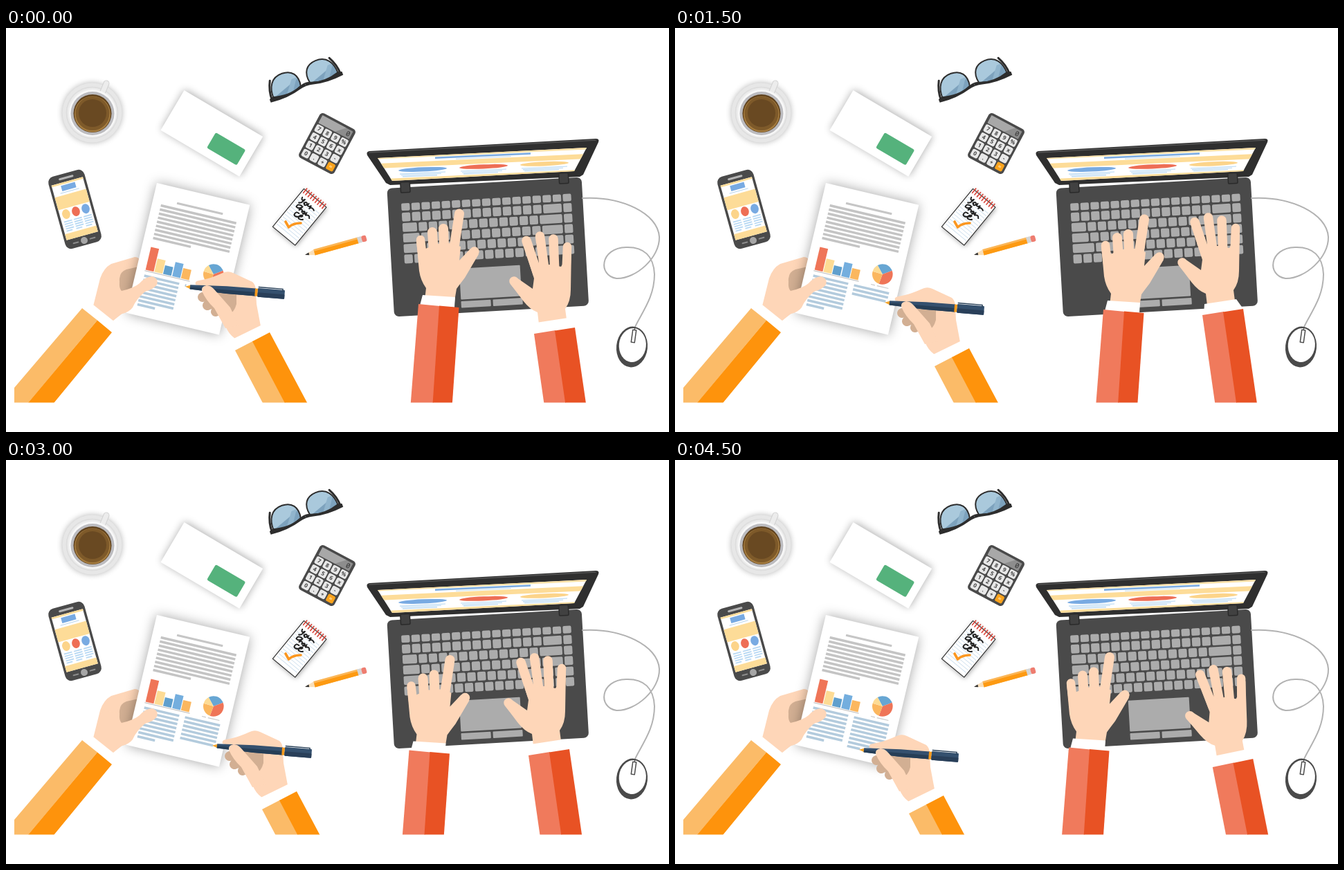
An HTML page with a canvas for the animation above (5 s loop, 958x584 px).

```html
<!DOCTYPE html>
<html lang="en">
<head>
<meta charset="utf-8">
<title>Desk work</title>
<style>
html, body { margin: 0; width: 100%; height: 100%; overflow: hidden; background: #fff; }
canvas { display: block; }
</style>
</head>
<body>
<canvas id="stage" width="958" height="584"></canvas>
<script>
const ctx = document.getElementById('stage').getContext('2d');
const SKIN = '#fed6b8', SHADE = '#d2af93', DARK = '#4a4a4a', NAVY = '#34506e', KEY = '#acacac';
const STEP = 500;

// Each pose: pen tip and row being written, left typing hand, right typing hand (dx, dy, degrees).
const poses = [
  { pen: [260, 374, 0], left: [0, 0], right: [0, 0, 0] },
  { pen: [308, 386, 0], left: [-6, -1], right: [9, 9, 0] },
  { pen: [257, 385, 2], left: [-11.5, 8], right: [18.5, 17.5, 0] },
  { pen: [304, 397, 2], left: [23, 8], right: [-1, -27, 0] },
  { pen: [254, 391, 3], left: [-21.5, 42], right: [77, 27, 0] },
  { pen: [278, 403, 4], left: [-17, 30], right: [20, -59, 0] },
  { pen: [299, 413, 5], left: [-13.5, 20.5], right: [-8, -15, 0] },
  { pen: [274, 414, 6], left: [-35, 7], right: [-25, -69, -8] },
  { pen: [296, 420, 6], left: [-56, -6], right: [-35, -49.5, -10] },
  { pen: [267, 419, 7], left: [-27, 16.5], right: [13.5, 0.5, -3] }
];

function fill(d, color) {
  ctx.fillStyle = color;
  ctx.fill(new Path2D(d));
}
function stroke(d, color, width, cap = 'round') {
  ctx.strokeStyle = color;
  ctx.lineWidth = width;
  ctx.lineCap = cap;
  ctx.lineJoin = 'round';
  ctx.stroke(new Path2D(d));
}
function box(x, y, w, h, color, r = 0) {
  ctx.fillStyle = color;
  ctx.beginPath();
  ctx.roundRect(x, y, w, h, r);
  ctx.fill();
}
function oval(x, y, rx, ry, color, turn = 0) {
  ctx.fillStyle = color;
  ctx.beginPath();
  ctx.ellipse(x, y, rx, ry, turn, 0, 7);
  ctx.fill();
}
function at(x, y, deg, draw) {
  ctx.save();
  ctx.translate(x, y);
  ctx.rotate(deg * Math.PI / 180);
  draw();
  ctx.restore();
}
function shadowed(blur, alpha, draw, dx = 0, dy = 0) {
  ctx.save();
  ctx.shadowColor = `rgba(0,0,0,${alpha})`;
  ctx.shadowBlur = blur;
  ctx.shadowOffsetX = dx;
  ctx.shadowOffsetY = dy;
  draw();
  ctx.restore();
}

function cup() {
  shadowed(8, 0.3, () => oval(124.5, 122.5, 43, 43, '#e7e7e7'));
  oval(124.5, 122.5, 38, 38, '#dedede');
  oval(124.5, 122.5, 36, 36, '#ececec');
  stroke('M138,97 L145,80', '#d2d2d2', 9);
  stroke('M138,97 L145,80', '#ececec', 7);
  oval(125, 123, 34, 34, '#f8f8f8');
  oval(125, 123.5, 31.5, 31.5, '#bcbcc0');
  oval(125, 123.5, 27.5, 27.5, '#60431f');
  oval(125, 124.5, 26, 26, '#a57c3f');
  oval(125, 123.5, 24.5, 24.5, '#7e5a2a');
  oval(125, 123, 20, 20, '#694922');
}

function card() {
  at(257.5, 90, 30.5, () => {
    shadowed(12, 0.33, () => box(0, 0, 132, 67, '#fff'), 1, -1);
    box(70.3, 29.3, 50, 25.8, '#55b27c', 2.5);
  });
}

function glasses() {
  const lens = 'M7,4 C4,-12 11,-22 26,-22.5 C43,-23 50,-10 50,6 Q28,13 7,4 Z';
  at(431, 77.5, -21, () => {
    for (const side of [-1, 1]) {
      ctx.save();
      ctx.scale(side, 1);
      stroke('M53,8 Q53,-6 46,-19', '#2d2d2d', 3);
      fill(lens, '#aac9dc');
      ctx.save();
      ctx.clip(new Path2D(lens));
      ctx.translate(28, 0);
      ctx.scale(side, 1);
      fill('M-26,8 L26,-10 V16 H-26 Z', '#7da2bd');
      fill('M-8,16 L12,-10 L20,-10 L2,16 Z', '#91b5cd');
      ctx.restore();
      stroke(lens, '#2d2d2d', 2);
      fill('M0,2 Q5,2 8,4 Q28,11 50,4 L56,6 L56,11 Q30,14 9,8 Q5,7 0,7 Z', '#2d2d2d');
      ctx.restore();
    }
  });
}

function calculator() {
  at(464, 167, 28, () => {
    box(-29, -36.5, 58, 73, DARK, 5);
    box(-25, -33, 50, 12.5, '#8d8d8d', 1);
    fill('M-25,-33 H14 L2,-20.5 H-25 Z', '#a8a8a8');
    ctx.textAlign = 'center';
    ctx.textBaseline = 'middle';
    ctx.font = '10px "Noto Sans Mono", monospace';
    ctx.fillStyle = '#333';
    ctx.fillText('0', 20, -26);
    ctx.font = 'bold 8px "Open Sans", sans-serif';
    [...'789%456x123-0.+='].forEach((key, i) => {
      const x = -20 + i % 4 * 13.4, y = -13 + Math.floor(i / 4) * 13.4;
      box(x - 5.7, y - 5.7, 11.4, 11.4, i === 15 ? '#fba31c' : '#e8e8e8', 2.5);
      ctx.fillStyle = i === 15 ? '#fde3b5' : '#444';
      ctx.fillText(key, x, y + 0.5);
    });
  });
}

function phone() {
  at(99.5, 262, -15.5, () => {
    box(-27, -54, 54, 108, DARK, 9);
    box(-11, -49, 22, 3, '#b5b5b5', 1.5);
    box(-23.5, -42, 47, 82, '#fff');
    box(-23.5, -42, 47, 2.5, '#fddc98');
    box(-10.5, -38, 21, 8, '#78aae2');
    box(-14, -28, 28, 1, '#b9d6ee');
    box(-23.5, -24, 47, 19, '#fddc98');
    ['#fcd48a', '#ee6e55', '#78aae2'].forEach((color, i) => {
      const x = -14 + i * 14.6;
      oval(x, 3.4, 5.8, 7, color);
      for (let j = 0; j < 5; j++) box(x - 6, 13 + j * 3.4, j === 4 ? 9 : 12, 1.7, '#b5d7f3');
    });
    box(-23.5, 31, 47, 9, '#fddc98');
    oval(1, 47, 5, 5, '#a6a6a6');
    box(-16, 46, 9, 2, '#8c8c8c', 1);
    box(9, 46, 9, 2, '#8c8c8c', 1);
  });
}

function notepad() {
  at(430.5, 232.5, 39.5, () => {
    shadowed(7, 0.35, () => box(0, 0, 42, 71, '#fff'), 1, 2);
    for (let y = 13; y < 68; y += 4.6) box(2, y, 38, 0.9, '#cfe0ee');
    ctx.strokeStyle = '#333';
    ctx.lineWidth = 1.2;
    ctx.strokeRect(0, 0, 42, 71);
    for (let x = 3; x < 41; x += 4.4) stroke(`M${x},-3 V5`, '#d94b40', 1.7);
    stroke('M6,11 q2,6 5,0 q-1,9 -4,9 M13,16 q2,-6 5,-1 q-3,5 -4,0 M19,12 q0,6 4,2 q1,-4 1,3 q2,-5 7,-2', '#222', 2);
    stroke('M13,21 q-7,1 -5,6 q5,1 7,-6 l-1,7 q3,-6 5,0 q2,-6 5,-1 q-4,4 -2,0 M25,24 l1,4 q4,-5 7,0', '#222', 2);
    stroke('M17,32 q-6,0 -4,6 q4,2 7,-3 q5,-2 3,-4 q-5,2 -2,7 q4,0 6,-3', '#222', 2);
  });
  stroke('M404,280 L408.5,288 Q415,282 426,282', '#fb9720', 3.6);
}

function pencil() {
  at(432, 328, -15.4, () => {
    fill('M0,0 L15,-4.5 V4.5 Z', '#f9dfba');
    fill('M0,0 L6,-1.9 V1.9 Z', '#333');
    box(14, -4.5, 66, 9, '#fbb657');
    box(14, -1.5, 66, 6, '#fd9a12');
    box(79, -4.5, 6, 9, '#d5d5d5');
    box(85, -4.5, 7, 9, '#ee7d70', 2);
  });
}

function laptop() {
  fill('M525,178 L852,160 Q858,160 856,165 L834,212 L829,215 L555,227 L549,224 L522,184 Q520,179 525,178 Z', '#2f2f2f');
  stroke('M525,180 L852,162', '#555', 1.5);
  ctx.save();
  ctx.clip(new Path2D('M537,188 L839,173 L821,207 L558,221 Z'));
  ctx.transform(1, -0.046, 0, 1, 0, 537 * 0.046);
  box(530, 180, 320, 60, '#fff');
  box(530, 185, 320, 4.5, '#fde0a4');
  box(620, 190.4, 138, 2.4, '#78aae2');
  box(650, 194, 80, 1, '#c3dcf0');
  box(530, 196, 320, 7, '#fddc98');
  ['#78aae2', '#ee6e55', '#fcd48a'].forEach((color, i) => {
    const x = 602 + i * 88;
    oval(x, 207.4, 35, 3.1, color);
    for (let j = 0; j < 3; j++) box(x - 33 + j * 2, 212 + j * 2, 66 - j * 8, 1.1, '#b5d7f3');
  });
  box(530, 218.5, 320, 8, '#fddc98');
  ctx.restore();

  at(550.4, 231.8, -3.3, () => {
    box(0, 0, 281.6, 186, DARK, 7);
    const rows = [
      Array(17).fill(1),
      [...Array(14).fill(1), 2, 1],
      [1.6, ...Array(12).fill(1), 2.4, 1],
      [1.8, ...Array(12).fill(1), 2.2, 1],
      [2.3, ...Array(11).fill(1), 1.7, 1, 1],
      Array(17).fill(1)
    ];
    rows.forEach((row, r) => {
      const y = r ? 21.2 + r * 15.2 : 23;
      let x = 19.3;
      for (const size of row) {
        box(x, y, size * 14.6 - 2.4, r ? 12.8 : 10.6, KEY, 2);
        x += size * 14.6;
      }
    });
    box(97.5, 121.7, 88, 45, KEY, 1);
    box(97.5, 169.2, 43, 9.5, KEY, 1);
    box(143.5, 169.2, 43, 9.5, KEY, 1);
  });
  for (const [x, y] of [[569, 223], [798, 210]]) at(x, y, -3.3, () => {
    box(0, 0, 15, 16, '#2a2a2a', 2);
    box(1.5, 1, 12, 13.5, '#414141', 1);
  });
}

function mouse() {
  stroke('M833,246 C890,243 942,268 944,302 C945,332 910,363 882,362 C855,358 858,318 896,317 C922,316 936,330 937,356 C937,390 918,412 908,434', '#b2b2b2', 2);
  oval(904.5, 461, 22.5, 29.5, DARK, 0.1);
  oval(905.3, 458.5, 19.5, 24.5, '#fff', 0.1);
  at(907, 445.5, 8, () => {
    ctx.strokeStyle = DARK;
    ctx.lineWidth = 1.5;
    ctx.strokeRect(-2.5, -9, 5, 18);
    stroke('M0,-9 V-13', DARK, 1.2);
  });
}

const penX = ([x, y]) => (x - 218) * 0.973 + (y - 224) * 0.23;

function paper(pen) {
  at(218, 224, 13.3, () => {
    shadowed(17, 0.36, () => box(0, 0, 138, 193, '#fff'));
    box(35, 20.2, 68, 3, '#c6c6c6');
    for (let i = 0; i < 9; i++) box(13, 28.5 + i * 6.05, i === 8 ? 56 : 112, 3.5, '#c4c4c4');
    [[13, 34, '#ef7558'], [26, 20, '#fddb94'], [39, 13, '#5f9fcd'], [52.5, 21, '#74aede'], [65.5, 15, '#fbb75f']]
      .forEach(([x, h, color]) => box(x, 126 - h, 12, h, color));
    box(12, 127, 67, 1, '#bbb');
    [[-2.3, -0.6, '#67a6d3'], [-0.6, 1.7, '#ef7558'], [1.7, 3.2, '#fbb75f'], [3.2, 3.98, '#fddb94']]
      .forEach(([from, to, color]) => {
        ctx.fillStyle = color;
        ctx.beginPath();
        ctx.moveTo(110, 109.6);
        ctx.arc(110, 109.6, 14.8, from, to);
        ctx.fill();
      });
    box(97, 127, 6, 1.2, '#c8c8c8');
    box(106, 127, 17, 1.2, '#c8c8c8');
    for (let i = 0; i < 8; i++) {
      const y = 132.8 + i * 6.1;
      box(13, y, i === 7 ? 26 : 52, 3.5, '#b3cbdd');
      if (i <= pen[2]) box(73.5, y, i < pen[2] ? 52 : Math.max(0, penX(pen) - 73.5), 3.5, '#b3cbdd');
    }
  });
}

function holdingFingers() {
  fill('M126,402 L136,362 Q141,347 152,341 L186,331 Q196,331 194,347 L190,395 L155,423 Z', SKIN);
  fill('M164,362 Q165,352 174,349 L196,344 L190,378 L163,382 Z', SHADE);
}

function holdingArm() {
  fill('M126,402 L140,362 L164,366 Q163,376 167,380 Q185,376 193,369 Q202,359 211,359 Q221,362 218,371 Q213,378 201,381 Q188,392 183,404 Q178,411 165,414 L153,424 Z', SKIN);
  fill('M126,400 L156,424 L153,440 L110,405 Z', '#fff');
  fill('M110,405 L132,422.5 L33,541 L12,560 V520 Z', '#fbbb68');
  fill('M132,422.5 L153,440 L70,541 L60,555 L21,555 Z', '#fe930c');
}

function writingArm([x, y]) {
  ctx.save();
  ctx.translate(x - 260, y - 374);
  stroke('M284,389 L296,386 M291,401 L303,396 M303,410 L312,405', SHADE, 14);
  fill('M274,371 Q272,366 279,365 C292,363 304,358 316,353 Q322,351 328,354 L356,367 Q361,371 361,380 L362,399 L368,431 L331,449 Q321,442 317,430 L296,396 L290,374 Z', SKIN);
  fill('M292,374 L333,383 L333,399 Q330,411 321,415 Z', SHADE);
  at(259, 373.8, 4.6, () => {
    fill('M0,0 L8,-3 V3 Z', '#f5a52c');
    fill('M7,-3.2 L60,-5.5 H102 V5.5 H60 L7,3.2 Z', NAVY);
    fill('M7,0 H102 V5.5 H60 L7,3.2 Z', '#263e56');
    box(101, -5.5, 4, 11, '#f59a1d');
    box(105, -6.2, 39, 12.6, NAVY, 1);
    box(105, 0, 39, 6.4, '#293f59', 1);
    stroke('M106,-7.8 H141 V-5', '#263e56', 1.4);
  });
  fill('M283,380 Q282,373 290,372 Q296,372 301,378 L324,404 L336,430 L317,434 L301,405 Q289,394 283,380 Z', SKIN);
  fill('M327,450 L370,429 L381,440 L331,466 Z', '#fff');
  fill('M331,466 L357,452.5 L456,641 H423 Z', '#fbbb68');
  fill('M356,453 L381,440 L488,641 H455 Z', '#fe930c');
  ctx.restore();
}

function leftTyping([dx, dy]) {
  ctx.save();
  ctx.translate(dx, dy);
  stroke('M599,306 L603,340', SKIN, 12.5);
  stroke('M616,295 L619,340 M632,290 L634,340 M655,268.5 L644,340', SKIN, 14);
  stroke('M677,323 L660,345', SKIN, 13.5);
  fill('M593,308 L597,351 Q599,365 607,376 L605,393 L648,395 L651,377 Q656,370 663,361 L683,327 L671,319 L655,336 L657,316 L642,311 L624,312 L606,319 Z', SKIN);
  fill('M602,386 L649,389 L648,404 L598,401 Z', '#fff');
  fill('M596,399 L627,402 L611,641 H577 Z', '#f07a5c');
  fill('M626,401.5 L654.5,404 L638,641 H610 Z', '#e85224');
  ctx.restore();
}

function rightTyping([dx, dy, deg]) {
  at(792.5 + dx, 437.5 + dy, deg, () => {
    ctx.translate(-792.5, -437.5);
    stroke('M752,307.5 L768,355 M771.5,301 L779,355 M791,305 L793,355', SKIN, 13.5);
    stroke('M811,316 L809,360', SKIN, 12.5);
    stroke('M734,366 L752,388', SKIN, 13.5);
    fill('M753,330 L763,362 L761,377 L738,361 L729,370 L747,394 Q757,407 768,411 L770,428 L810,421 L808,406 Q816,395 816,378 L817,320 L802,345 L786,342 L771,343 Z', SKIN);
    fill('M766,426 L812,419 L822,433 L765,441 Z', '#fff');
    fill('M763,442 L794,437 L832,700 H800 Z', '#f07a5c');
    fill('M793,437.5 L822,433 L861,700 H831 Z', '#e85224');
  });
}

function draw(pose) {
  ctx.fillStyle = '#fff';
  ctx.fillRect(0, 0, 958, 584);
  ctx.save();
  ctx.beginPath();
  ctx.rect(12, 0, 934, 541.5);
  ctx.clip();
  cup();
  card();
  glasses();
  calculator();
  phone();
  notepad();
  pencil();
  laptop();
  mouse();
  holdingFingers();
  paper(pose.pen);
  holdingArm();
  writingArm(pose.pen);
  leftTyping(pose.left);
  rightTyping(pose.right);
  ctx.restore();
}

const start = performance.now();
let shown = -1;
function tick() {
  const step = Math.floor((performance.now() - start) / STEP) % poses.length;
  if (step !== shown) draw(poses[shown = step]);
  requestAnimationFrame(tick);
}
tick();
</script>
</body>
</html>
```
